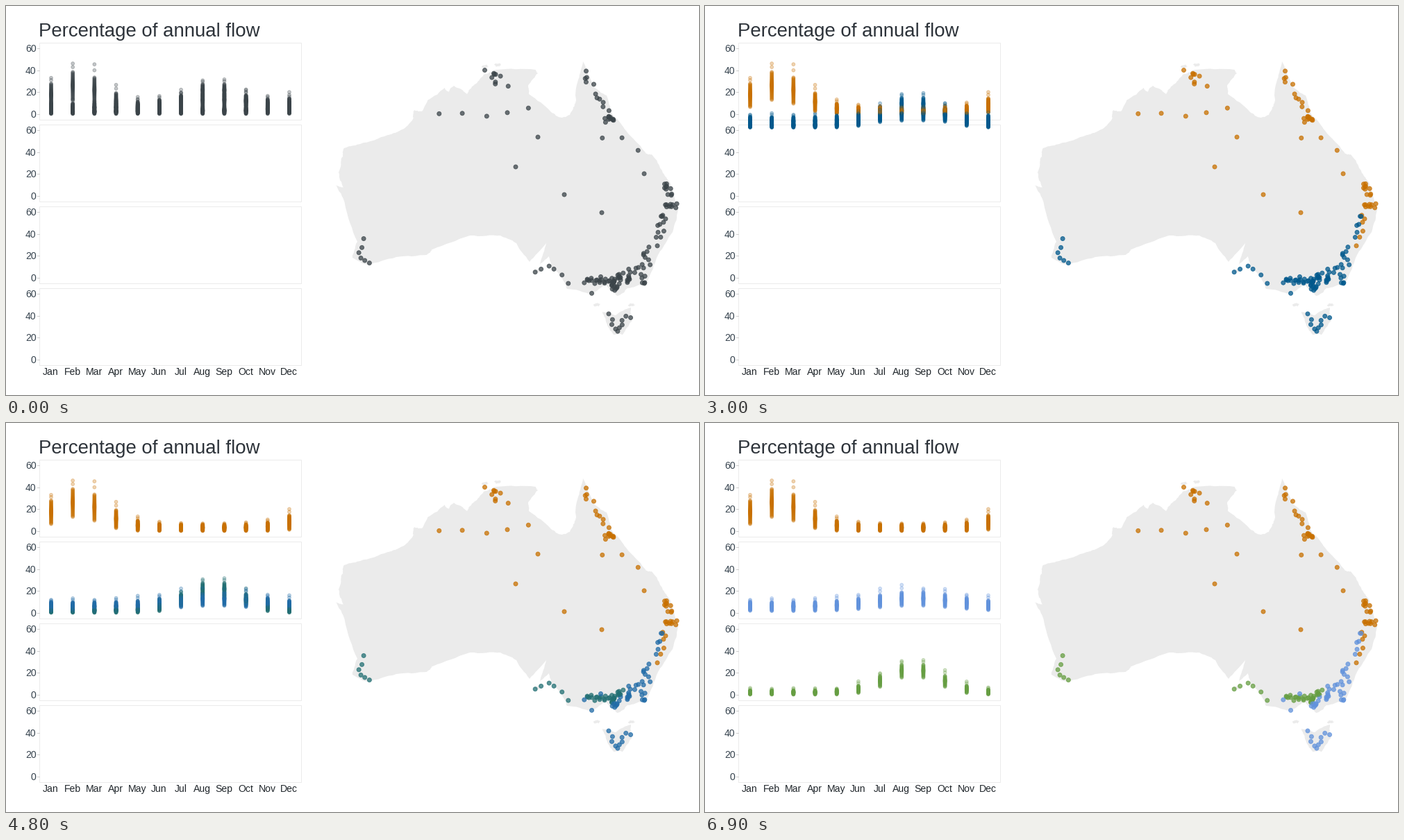
Write a matplotlib script that moves like this. It is 998 by 561 pixels and loops after 8 s.

```python
import numpy as np
import matplotlib.pyplot as plt
from matplotlib.animation import FuncAnimation
from matplotlib.colors import to_rgb
from matplotlib.patches import Polygon, Rectangle

W, H, DPI = 998, 561, 64
PT = 72 / DPI  # points per pixel
rng = np.random.default_rng(7)

DARK, ORANGE, NAVY, SKY, GREEN = (
    np.array(to_rgb(c))
    for c in ("#3b4449", "#c87000", "#00588c", "#6192dc", "#669e42"))
LAND = "#ebebeb"
MONTHS = "Jan Feb Mar Apr May Jun Jul Aug Sep Oct Nov Dec".split()
PITCH, UNIT, ZERO = 118, 1.575, 155.6

# Key points of the coast, clockwise from the north-west cape
MAINLAND = [
    (484, 218), (486, 206), (505, 200), (545, 188), (573, 177), (586, 163),
    (588, 150), (599, 152), (607, 136), (632, 118), (637, 124), (645, 115),
    (664, 127), (675, 113), (688, 99), (705, 92), (763, 92), (766, 97),
    (753, 113), (753, 127), (785, 153), (800, 161), (812, 157), (820, 140),
    (823, 110), (831, 80), (847, 117), (865, 129), (873, 156), (896, 184),
    (922, 213), (930, 214), (946, 241), (957, 256), (968, 294), (960, 326),
    (939, 359), (922, 399), (895, 407), (880, 418), (863, 402), (843, 415),
    (808, 408), (798, 388), (786, 377), (782, 361), (769, 373), (778, 342),
    (754, 369), (735, 342), (712, 331), (668, 331), (614, 351), (606, 359),
    (562, 362), (521, 373), (499, 363), (506, 340), (488, 285), (475, 258),
    (486, 262), (479, 240)]
TASMANIA = [(859, 441), (878, 446), (900, 435), (901, 455), (888, 474),
            (875, 474), (866, 460)]
ISLETS = [(690, 87), (708, 85), (766, 382), (851, 431), (901, 431)]

# Gauging stations: count, scatter in pixels, and the line they follow
NORTHERN = [
    (9, 12, [(692, 104), (716, 108)]),
    (5, 2, [(622, 154), (691, 158), (751, 148)]),
    (4, 0, [(766, 189), (734, 232), (804, 272), (858, 298)]),
    (13, 5, [(832, 92), (842, 117), (860, 142), (867, 163)]),
    (8, 4, [(871, 163)]),
    (4, 2, [(857, 191), (904, 192), (921, 241)]),
    (10, 5, [(951, 254), (955, 273)]),
    (9, 3, [(950, 288), (965, 288)]),
    (6, 3, [(947, 300), (948, 316), (941, 348)])]
EASTERN = [
    (13, 5, [(940, 302), (940, 325), (918, 361), (929, 370)]),
    (12, 4, [(920, 376), (896, 384), (895, 400)]),
    (6, 4, [(918, 387), (915, 401)]),
    (12, 5, [(898, 394), (874, 402), (881, 411)]),
    (3, 2, [(833, 400), (844, 415), (857, 390)]),
    (10, 5, [(868, 447), (879, 470), (898, 447)])]
SOUTHERN = [
    (6, 2, [(514, 337), (509, 362), (524, 370)]),
    (6, 2, [(762, 383), (786, 372), (810, 400)]),
    (15, 4, [(837, 396), (866, 398)]),
    (18, 5, [(873, 399), (886, 389)])]

# Season per group: peak month, then (base, rise, width) of the low and high
SEASONS = [
    (1.2, (0, 13, 1.4), (6, 34, 1.9)),
    (7.6, (1.5, 5, 2.6), (10, 10, 2.6)),
    (7.5, (0, 17, 1.6), (4, 26, 1.9))]


def roughen(outline, amount):
    """Split every edge in two, three times, pushing new points aside."""
    pts = np.array(outline, float)
    for size in (amount, amount / 2, amount / 2):
        mid = (pts + np.roll(pts, -1, axis=0)) / 2
        mid += rng.uniform(-size, size, mid.shape)
        pts = np.stack([pts, mid], axis=1).reshape(-1, 2)
    return pts


def islet(x, y):
    angle = np.linspace(0, 2 * np.pi, 6, endpoint=False)
    return np.column_stack([x + 5 * np.cos(angle), y + 2.5 * np.sin(angle)])


def scatter_along(count, spread, path):
    pts = np.array(path, float)
    nodes = np.arange(len(pts))
    steps = np.linspace(0, nodes[-1], count)
    x, y = (np.interp(steps, nodes, pts[:, k]) for k in (0, 1))
    return np.column_stack([x, y]) + rng.uniform(-spread, spread, (count, 2))


def monthly_flow(peak, low, high, count):
    """One row per station, one column per month."""
    month = np.arange(12)
    away = (month - peak + 6) % 12 - 6
    bottom, top = (base + rise * np.exp(-(away / width) ** 2)
                   for base, rise, width in (low, high))
    t = np.linspace(0, 1, count)
    share = t + 0.08 * np.sin(2 * np.pi * t)
    columns = []
    for lo, hi in zip(bottom, top):
        tail = rng.uniform(0.1, 0.5)
        q = np.append(share[:-2], [1 + tail / 2, 1 + tail])
        columns.append(lo + (hi - lo) * rng.permutation(q))
    return np.column_stack(columns)


def ramp(frame, start, steps=6):
    return min(max((frame - start + 1) / steps, 0), 1)


def label(x, y, text, size, color, ha):
    ax.text(x, y, text, fontsize=size * PT, color=color, ha=ha,
            va="baseline", family="Liberation Sans")


def dots(x, y, radius):
    return ax.scatter(x, y, s=(2 * radius * PT) ** 2, linewidths=0.94 * PT,
                      zorder=3)


def paint(points, colors, alpha):
    rgba = np.column_stack([colors, np.full(len(colors), alpha)])
    points.set_facecolor(rgba)
    points.set_edgecolor(rgba)


fig = plt.figure(figsize=(W / DPI, H / DPI), dpi=DPI, facecolor="white")
ax = fig.add_axes([0, 0, 1, 1])
ax.set_xlim(0, W)
ax.set_ylim(H, 0)
ax.axis("off")

# Panels and labels
label(46.6, 44, "Percentage of annual flow", 27.6, "#2d333a", "left")
for panel in range(4):
    top = PITCH * panel
    ax.add_patch(Rectangle((48.5, 52.5 + top), 377, 111, fill=False,
                           ec=LAND, lw=PT))
    for value in (0, 20, 40, 60):
        y = ZERO + top - UNIT * value
        ax.plot([45, 48], [y, y], color="#cfcfcf", lw=PT)
        label(43.5, y + 5.2, str(value), 14, "#36434e", "right")
month_x = 65 + 31.18 * np.arange(12)
for x, name in zip(month_x, MONTHS):
    label(x - 0.7, 532, name, 14, "#20262b", "center")

# Land
for outline, amount in [(MAINLAND, 1.5), (TASMANIA, 1.2)]:
    ax.add_patch(Polygon(roughen(outline, amount), fc=LAND, ec="none"))
for spot in ISLETS:
    ax.add_patch(Polygon(roughen(islet(*spot), 1), fc=LAND, ec="none"))

# Stations, mixed so that no group lies wholly on top
places = [np.vstack([scatter_along(*line) for line in lines])
          for lines in (NORTHERN, EASTERN, SOUTHERN)]
group = np.repeat([0, 1, 2], [len(p) for p in places])
flow = np.vstack([monthly_flow(*season, len(p))
                  for season, p in zip(SEASONS, places)])
order = rng.permutation(len(group))
group, flow, place = group[order], flow[order], np.vstack(places)[order]
chart_group = np.repeat(group, 12)
chart_x = np.tile(month_x, len(group))
chart_y = ZERO - UNIT * flow.ravel()

chart = dots(chart_x, chart_y, 2.4)
stations = dots(place[:, 0], place[:, 1], 3)

two_colors = np.array([ORANGE, NAVY, NAVY])
three_colors = np.array([ORANGE, SKY, GREEN])


def draw(frame):
    first, second = ramp(frame, 12), ramp(frame, 47)
    colors = DARK + (two_colors - DARK) * first
    colors = colors + (three_colors - two_colors) * second
    paint(chart, colors[chart_group], 0.3)
    paint(stations, colors[group], 0.75)

    shift = ramp(frame, 30) * (chart_group > 0)
    shift = shift + ramp(frame, 64) * (chart_group == 2)
    chart.set_offsets(np.column_stack([chart_x, chart_y + PITCH * shift]))
    return chart, stations


anim = FuncAnimation(fig, draw, frames=80, interval=100, repeat=True,
                     repeat_delay=0)
plt.show()
```
